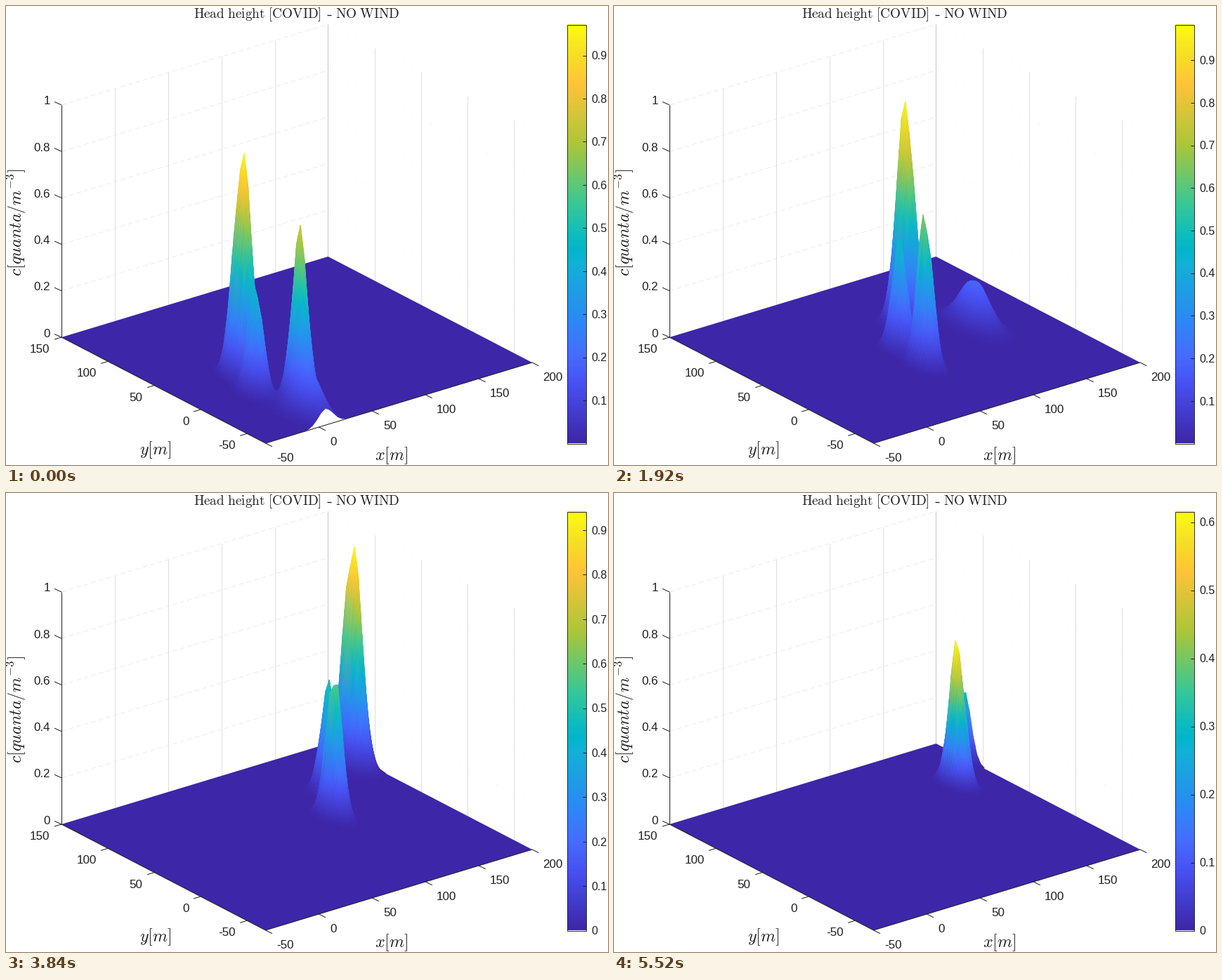
Write a matplotlib script that moves like this. It is 857 px wide and 654 px high and loops after 5.6 s.

```python
import numpy as np
import matplotlib.pyplot as plt
from matplotlib.animation import FuncAnimation
from matplotlib.colors import LinearSegmentedColormap
from matplotlib.patches import Polygon, Rectangle
from matplotlib.tri import Triangulation

W, H, DPI = 857, 654, 64
FRAMES, INTERVAL = 70, 80
INK = "#1f1f1f"
X0, X1, Y0, Y1 = -50, 200, -70, 150
BAR_L, BAR_R, BAR_T, BAR_B = 799.5, 826.5, 26.5, 623.5

plt.rcParams["font.family"] = "Liberation Sans"
plt.rcParams["mathtext.fontset"] = "cm"

PARULA = LinearSegmentedColormap.from_list("parula", [
    (0, (.2422, .1504, .6603)), (1 / 7, (.2810, .3228, .9579)),
    (1.5 / 7, (.272, .430, .995)), (2 / 7, (.1786, .5289, .9682)),
    (3 / 7, (.0689, .6948, .8394)), (.46, (.010, .711, .796)),
    (.5, (.060, .742, .738)), (4 / 7, (.2161, .7843, .5923)),
    (5 / 7, (.6720, .7793, .2227)), (6 / 7, (.9970, .7659, .2199)),
    (6.5 / 7, (.970, .870, .150)), (1, (.9769, .9839, .0805))], N=256)

# Each walker: start x, y; step per frame x, y; spread x, y; height, height loss per frame
WALKERS = [
    (9.0, 22.5, 3.74, 1.83, 4.3, 8.5, 1.0, 0),
    (14.1, -33.2, 2.21, 1.77, 3.8, 7.0, .72, .0013),
    (-1.0, -2.5, 2.97, 1.77, 3.8, 7.0, .50, 0),
    (6.5, -50.0, 5.71, 3.90, 7.0, 14.0, .20, 0),
]


def project(x, y, z=0):
    """Room coordinates to stage pixels."""
    u, v = np.subtract(x, X0), np.subtract(Y1, y)
    return (79 + 1.518 * u + 1.3205 * v,
            472 - .46 * u + .6864 * v - 331 * np.asarray(z))


def refine(a):
    """Insert the midpoints along the first axis."""
    out = np.empty((2 * len(a) - 1,) + a.shape[1:])
    out[::2] = a
    out[1::2] = (a[1:] + a[:-1]) / 2
    return out


xs = np.append(np.arange(X0, X1, 4.0), X1)
ys = np.arange(Y0, Y1 + 1, 4.0)
gx, gy = np.meshgrid(xs, ys)
fx, fy = np.meshgrid(refine(xs), refine(ys))

# Cells ordered from far to near, two triangles each
ids = np.arange(fx.size).reshape(fx.shape)
a, b, c, d = (q.ravel()[::-1] for q in
              (ids[:-1, :-1], ids[:-1, 1:], ids[1:, 1:], ids[1:, :-1]))
corners = np.stack([a, b, c, d], axis=1)
cells = np.stack([corners[:, [1, 2, 3]], corners[:, [0, 1, 3]]], axis=1)


def concentration(n):
    z = np.zeros_like(gx)
    for x, y, vx, vy, sx, sy, height, loss in WALKERS:
        dx = (gx - x - vx * n) / sx
        dy = (gy - y - vy * n) / sy
        z += (height - loss * n) * np.exp(-(dx ** 2 + dy ** 2) / 2)
    return z


fig = plt.figure(figsize=(W / DPI, H / DPI), dpi=DPI, facecolor="white")
ax = fig.add_axes([0, 0, 1, 1])
ax.set_xlim(0, W)
ax.set_ylim(H, 0)
ax.axis("off")
ax.autoscale(False)


def pt(px):
    return px * 72 / DPI


def line(p, q, color=INK, width=1.0, z=6, **kw):
    return ax.plot([p[0], q[0]], [p[1], q[1]], color=color, lw=pt(width),
                   zorder=z, solid_capstyle="butt", **kw)[0]


def label(x, y, s, size=17, ha="left", **kw):
    return ax.text(x, y, s, fontsize=pt(size), ha=ha, va="baseline",
                   color=INK, zorder=7, **kw)


def tick(p, dx, dy):
    line(p, (p[0] + dx, p[1] + dy))


# Back walls
for x in range(0, X1, 50):
    line(project(x, Y1), project(x, Y1, 1), "#dedede", z=1)
for y in range(-50, Y1, 50):
    line(project(X1, y), project(X1, y, 1), "#dedede", z=1)
line(project(X1, Y1), project(X1, Y1, 1), "#c4c4c4", z=1)
for k in range(1, 6):
    z = k / 5
    line(project(X0, Y1, z), project(X1, Y1, z), "#ebebeb", z=1, dashes=(7, 4))
    line(project(X1, Y1, z), project(X1, Y0, z), "#ececec", z=1, dashes=(1, 14))

# Axes, ticks and their labels
line(project(X0, Y1), project(X0, Y1, 1))
line(project(X0, Y1), project(X0, Y0))
line(project(X0, Y0), project(X1, Y0))
for k in range(6):
    p = project(X0, Y1, k / 5)
    tick(p, -10, -4.5)
    label(p[0] - 16, p[1] - .5, f"{k / 5:g}", ha="right")
for y in range(-50, Y1 + 1, 50):
    p = project(X0, y)
    tick(p, -10, 3)
    label(p[0] - 16.5, p[1] + 22, str(y), ha="right")
for x in range(X0, X1 + 1, 50):
    p = project(x, Y0)
    tick(p, 9.5, 4.7)
    label(p[0] + 15.5, p[1] + 25.5, str(x))

# Title and axis names
label(267, 17, r"$\mathrm{Head\ height\ [COVID]}$", 19.2)
line((457.5, 12.8), (463, 12.8), width=1.3)
label(561, 17, r"$\mathrm{NO\ WIND}$", 19.2, "right")
label(549, 647, "$x[m]$", 24, "center")
label(212.5, 639, "$y[m]$", 24, "center")
label(23, 308, "$c[quanta/m^{-3}]$", 24, "center",
      rotation=90, rotation_mode="anchor")

# Colour bar
ax.imshow(np.linspace(1, 0, 256)[:, None], cmap=PARULA, aspect="auto",
          extent=(BAR_L, BAR_R, BAR_B, BAR_T), zorder=5)
ax.add_patch(Rectangle((BAR_L, BAR_T), BAR_R - BAR_L, BAR_B - BAR_T,
                       fill=False, ec=INK, lw=pt(.9), zorder=6))
ax.set_xlim(0, W)
ax.set_ylim(H, 0)
bar_ticks = [(line((BAR_R - 5, 0), (BAR_R, 0)),
              label(833, 0, f"{k / 10:g}", 16)) for k in range(11)]

# Floor, and the gap under the raised front edge
ax.add_patch(Polygon(np.transpose(project([X0, X1, X1, X0], [Y0, Y0, Y1, Y1])),
                     fc=PARULA(0), lw=0, zorder=2))
gap = ax.add_patch(Polygon([(0, 0)] * 3, fc="white", lw=0, zorder=3))
surface = []


def draw(n):
    z = concentration(n)
    top = z.max()

    ends = xs[[-1, 0]]
    gap.set_xy(np.vstack([np.transpose(project(xs, np.full_like(xs, Y0), z[0])),
                          np.transpose(project(ends, [Y0, Y0]))]))

    while surface:
        surface.pop().remove()
    fz = refine(refine(z).T).T.ravel()
    raised = fz[corners].max(axis=1) > .003
    px, py = project(fx.ravel(), fy.ravel(), fz)
    mesh = Triangulation(px, py, cells[raised].reshape(-1, 3))
    surface.append(ax.tripcolor(mesh, fz, shading="gouraud", cmap=PARULA,
                                vmin=0, vmax=top, zorder=4))

    for k, (mark, text) in enumerate(bar_ticks):
        y = BAR_B - k / 10 / top * (BAR_B - BAR_T)
        shown = y >= BAR_T and (k > 0 or n >= 36)
        mark.set_ydata([y, y])
        text.set_y(y + 5.8)
        mark.set_visible(shown)
        text.set_visible(shown)


anim = FuncAnimation(fig, draw, frames=FRAMES, interval=INTERVAL,
                     init_func=lambda: None, repeat=True, repeat_delay=0)
plt.show()
```
